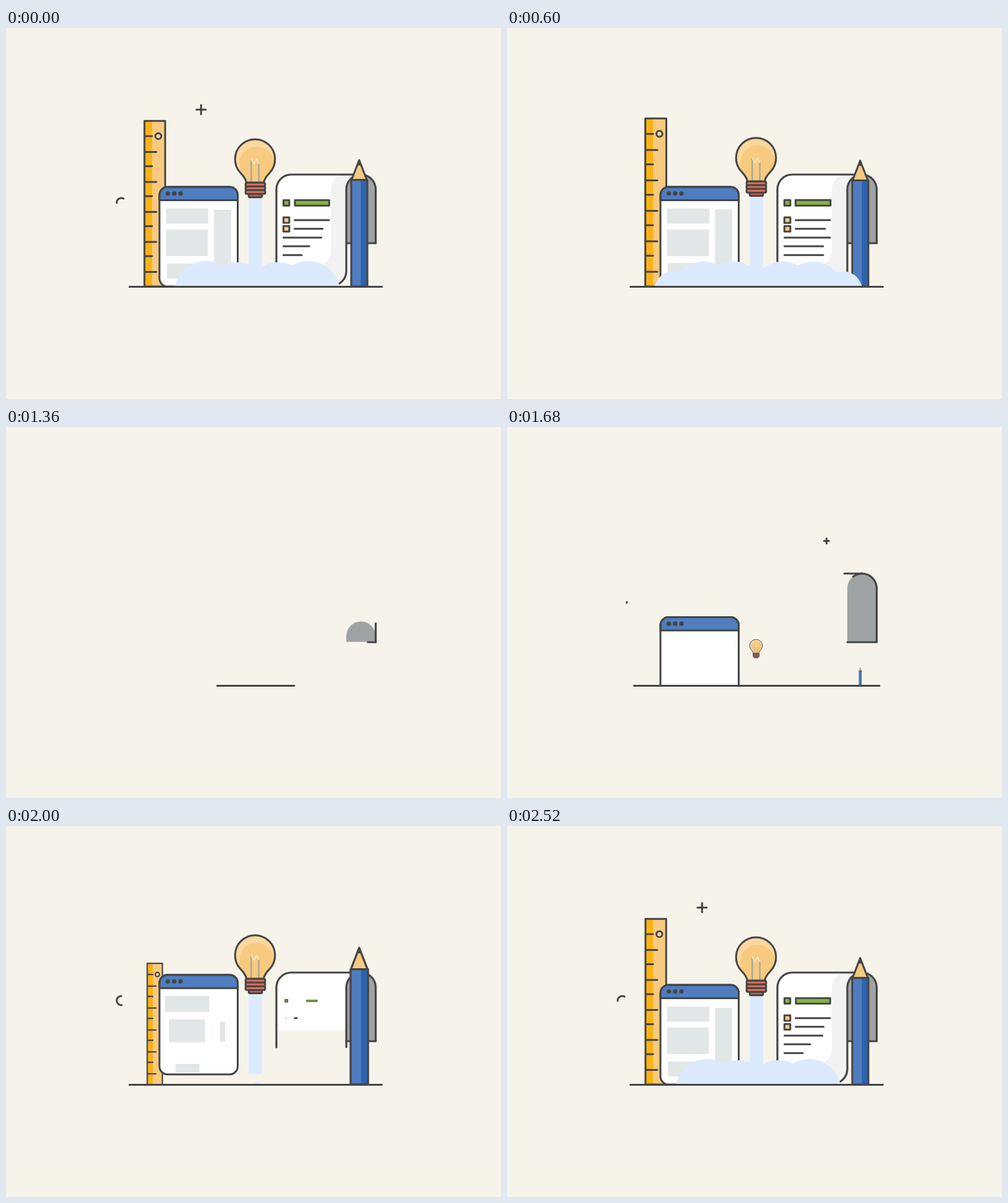
Recreate the animation shown at these times as an HTML page with a canvas. Size 800 px wide and 600 px high, loop 2560 ms.

```html
<!DOCTYPE html>
<html lang="en">
<head>
<meta charset="utf-8">
<title>Idea launch</title>
<style>
  html, body { margin: 0; width: 100%; height: 100%; overflow: hidden; background: #f6f3eb; }
  canvas { display: block; }
</style>
</head>
<body>
<canvas id="stage" width="800" height="600"></canvas>
<script>
const ctx = document.getElementById('stage').getContext('2d');
const LOOP = 2560, STEP = 40, CYCLE = 2520, CUT = 1240;
const INK = '#444544', WOOD = '#f7ca80', BLUE = '#4f7dc0', SMOKE = '#dbeaff', GREEN = '#86b440';
const GROUND = 418;

const clamp = (v, lo = 0, hi = 1) => Math.min(hi, Math.max(lo, v));
const ramp = (t, a, b) => clamp((t - a) / (b - a));
const smooth = p => (1 - Math.cos(Math.PI * p)) / 2;
const easeOut = p => 1 - (1 - p) ** 2;

// Linear rise over 200 ms, then a decaying wobble around 1
function spring(t, start) {
  const s = (t - start - 200) / 1000;
  return s < 0 ? Math.max(0, 1 + s * 5) : 1 + 0.19 * Math.exp(-5.3 * s) * Math.sin(2 * Math.PI * 1.7 * s);
}

// Piecewise linear track of [time, value] pairs
function track(t, keys) {
  for (let i = 1; i < keys.length; i++) {
    const [a, x] = keys[i - 1], [b, y] = keys[i];
    if (t <= b) return x + (y - x) * ramp(t, a, b);
  }
  return keys[keys.length - 1][1];
}

function paint(path, fill, stroke, width = 3) {
  if (fill) { ctx.fillStyle = fill; ctx.fill(path); }
  if (stroke) { ctx.strokeStyle = stroke; ctx.lineWidth = width; ctx.stroke(path); }
}
const shape = (d, fill, stroke, width) => paint(new Path2D(d), fill, stroke, width);

function box(x, y, w, h, fill, stroke, r = 0) {
  const p = new Path2D();
  p.roundRect(x, y, w, h, r);
  paint(p, fill, stroke);
}
function disc(x, y, r, fill, stroke) {
  const p = new Path2D();
  p.arc(x, y, r, 0, 7);
  paint(p, fill, stroke);
}
function line(x1, y1, x2, y2, color = INK, width = 3) {
  shape(`M${x1} ${y1}L${x2} ${y2}`, null, color, width);
}
function trim(d, length) {
  if (length <= 0) return;
  ctx.setLineDash([length, 2000]);
  shape(d, null, INK, 3.2);
  ctx.setLineDash([]);
}
function group(draw) {
  ctx.save();
  draw();
  ctx.restore();
}
function scaled(x, y, s, draw) {
  if (s <= 0) return;
  group(() => {
    ctx.translate(x, y);
    ctx.scale(s, s);
    ctx.translate(-x, -y);
    draw();
  });
}
function clipRect(x, y, w, h) {
  ctx.beginPath();
  ctx.rect(x, y, w, h);
  ctx.clip();
}

function ruler(t) {
  scaled(240.5, GROUND, spring(t, 576), () => {
    box(223.5, 146, 34, 272, WOOD);
    box(223.5, 146, 12.5, 272, '#fbb216');
    box(223.5, 146, 34, 272, null, INK);
    for (let i = 0; i < 5; i++) {
      line(225, 171 + i * 49.3, 236, 171 + i * 49.3);
      line(225, 197 + i * 49.3, 243, 197 + i * 49.3);
    }
    disc(246.3, 171, 4.8, '#f9d79d', INK);
  });
}

function browser(t) {
  const rise = 165 - 182 * easeOut(ramp(t, 220, 680)) + 17 * smooth(ramp(t, 680, 1000));
  const block = (x, y, w, h, start, ay = y + h / 2) =>
    scaled(x + w / 2, ay, spring(t, start), () => box(x, y, w, h, '#e3e6e6'));
  group(() => {
    clipRect(200, 0, 300, GROUND + 1);
    ctx.translate(0, rise);
    box(248, 257, 126.5, 161, '#fff', null, 13);
    shape('M248 278.5V270a13 13 0 0 1 13-13H361.500a13 13 0 0 1 13 13V278.500Z', BLUE, INK);
    box(248, 257, 126.5, 161, null, INK, 13);
    for (const x of [261.5, 271.8, 282]) disc(x, 267.7, 3.6, INK);
    block(258.5, 292, 68.5, 24.5, 490);
    block(258.5, 326, 68, 43, 548);
    block(259.5, 380, 68, 24.5, 606, 429);
    block(336, 293, 28, 112, 662);
  });
}

function bulb(t) {
  const dy = -1.4 - 1.75 * Math.cos(2 * Math.PI * (t - 640) / 1480);
  const jet = 274 + 144 * ramp(t, 540, 744);
  if (t > 540) box(392.2, 268 + dy, 21.6, jet - 268 - dy, SMOKE);
  scaled(402.5, 421, smooth(ramp(t, 300, 562)), () => {
    ctx.translate(0, dy);
    const glass = new Path2D('M388.500 250C387.500 243 383 238.500 378.700 234A32.300 32.300 0 1 1 426.300 234C422 238.500 417.500 243 416.500 250Z');
    paint(glass, '#f9d79d');
    group(() => {
      ctx.clip(glass);
      disc(405, 220, 28, WOOD);
      box(384, 232, 38, 18, WOOD);
    });
    line(396.3, 213, 396.3, 249, '#a9a49b', 2.4);
    line(408.6, 219, 408.6, 249, '#a9a49b', 2.4);
    shape('M396.500 212L400.500 220L405 212L408.500 219', null, '#f9e3b5', 2.2);
    paint(glass, null, INK);
    box(392.3, 268, 21.5, 5.6, '#d9573f', INK, 2);
    for (let i = 0; i < 3; i++) box(387.2, 250.2 + i * 6, 31.6, 6, '#e0715a', INK, 2);
  });
}

function backSheet(t) {
  const top = 348 - clamp(0.42 * t, 0, 111);
  group(() => {
    clipRect(540, 200, 80, 147.5);
    shape(`M550 348V${top + 24}a23.750 24 0 0 1 47.500 0V348Z`, '#9fa3a3');
  });
  trim('M597.500 348H550', clamp(0.16 * t, 0, 47.5));
  trim('M597.500 348V261A23.750 24 0 0 0 573.750 237', clamp(0.38 * t, 0, 125));
}

function paper(t) {
  group(() => {
    clipRect(430, 230, 150, 7 + 180 * smooth(ramp(t, 500, 930)));
    shape('M437 417V261a24 24 0 0 1 24-24H574A24 24 0 0 0 550 261V393a24 24 0 0 1-24 24Z', '#fff');
    ctx.globalAlpha = ramp(t, 760, 960);
    shape('M574 237H549A24 24 0 0 0 525 261V361a24 24 0 0 1-24 24V417H526a24 24 0 0 0 24-24V261A24 24 0 0 1 574 237Z', '#f2f2f2');
  });
  const q = 0.00277 * (t - 358);
  trim('M574 237H461a24 24 0 0 0-24 24V417', 246.7 * q);
  trim('M574 237A24 24 0 0 0 550 261V393a24 24 0 0 1-24 24', 133.7 * q);

  const tile = (x, y, w, h, fill, start) =>
    scaled(x + w / 2, y + h / 2, spring(t, start), () => box(x, y, w, h, fill, INK));
  tile(448.3, 278.3, 9.6, 9, GREEN, 630);
  tile(466.3, 278.3, 56.6, 9, GREEN, 660);
  tile(448.3, 306.2, 9.6, 9, WOOD, 700);
  tile(448.3, 320.2, 9.6, 9, WOOD, 730);

  const rows = [[466.5, 522, 310.7, 630], [466.5, 514, 324.7, 760], [448.5, 522, 339, 830],
                [448.5, 511, 353, 900], [448.5, 511, 367.3, 970]];
  for (const [a, b, y, start] of rows)
    if (t > start) line(a, y, a + (b - a) * smooth(ramp(t, start, start + 560)), y);
}

function pencil(t) {
  scaled(570.8, GROUND, spring(t, 372), () => {
    shape('M558.500 246.500L570.800 214.500L583.200 246.500Z', WOOD, INK);
    shape('M567 223L570.800 213.500L574.600 223Z', INK);
    box(558, 246.5, 26, 171.5, BLUE);
    box(573.5, 246.5, 10.5, 171.5, '#2f62ad');
    box(558, 246.5, 26, 171.5, null, INK);
  });
}

// Puffs drift away from the jet on both sides, swelling and shrinking
function smoke(t) {
  const life = 950;
  group(() => {
    clipRect(100, 300, 600, GROUND - 300);
    for (let born = 690; born < t; born += 192) {
      const age = t - born;
      if (age > life) continue;
      const r = 53 * Math.sin(Math.PI * age / life);
      const d = Math.max(0, 0.255 * (age - 226));
      for (const side of [-1, 1]) disc(406 + side * d, GROUND + 0.2 * r, r, SMOKE);
    }
  });
}

function plus(x, y, age) {
  if (age <= 0 || age >= 320) return;
  const outer = 7.5 * ramp(age, 0, 150), inner = 7.5 * ramp(age, 170, 320);
  for (const [dx, dy] of [[1, 0], [-1, 0], [0, 1], [0, -1]])
    line(x + dx * inner, y + dy * inner, x + dx * outer, y + dy * outer);
}

function ring(x, y, age) {
  if (age <= 0 || age >= 1160) return;
  const rad = Math.PI / 180;
  const head = track(age, [[0, 0], [340, 270], [860, 300], [1140, 358]]);
  const tail = track(age, [[0, 0], [340, 85], [860, 175], [1140, 355]]);
  const p = new Path2D();
  p.arc(x, y, 7.4, tail * rad, head * rad);
  paint(p, null, INK);
}

function ground(t) {
  const half = 204 * easeOut(ramp(t, 0, 480));
  if (half > 0) line(403.5 - half, 418.5, 403.5 + half, 418.5);
}

function draw(now) {
  const clock = Math.min(CYCLE, Math.floor((now % LOOP) / STEP) * STEP);
  const t = (clock - CUT + CYCLE) % CYCLE - 40;
  ctx.fillStyle = '#f6f3eb';
  ctx.fillRect(0, 0, 800, 600);
  ctx.lineCap = ctx.lineJoin = 'round';
  ruler(t);
  browser(t);
  bulb(t);
  backSheet(t);
  paper(t);
  pencil(t);
  smoke(t);
  ground(t);
  plus(516.4, 184.3, t - 320);
  plus(315.3, 132, t - 1080);
  plus(158.8, 145.8, t - 1950);
  ring(186.3, 282.3, t - 380);
  ring(588.7, 147.2, t - 2190);
  requestAnimationFrame(draw);
}
requestAnimationFrame(draw);
</script>
</body>
</html>
```
